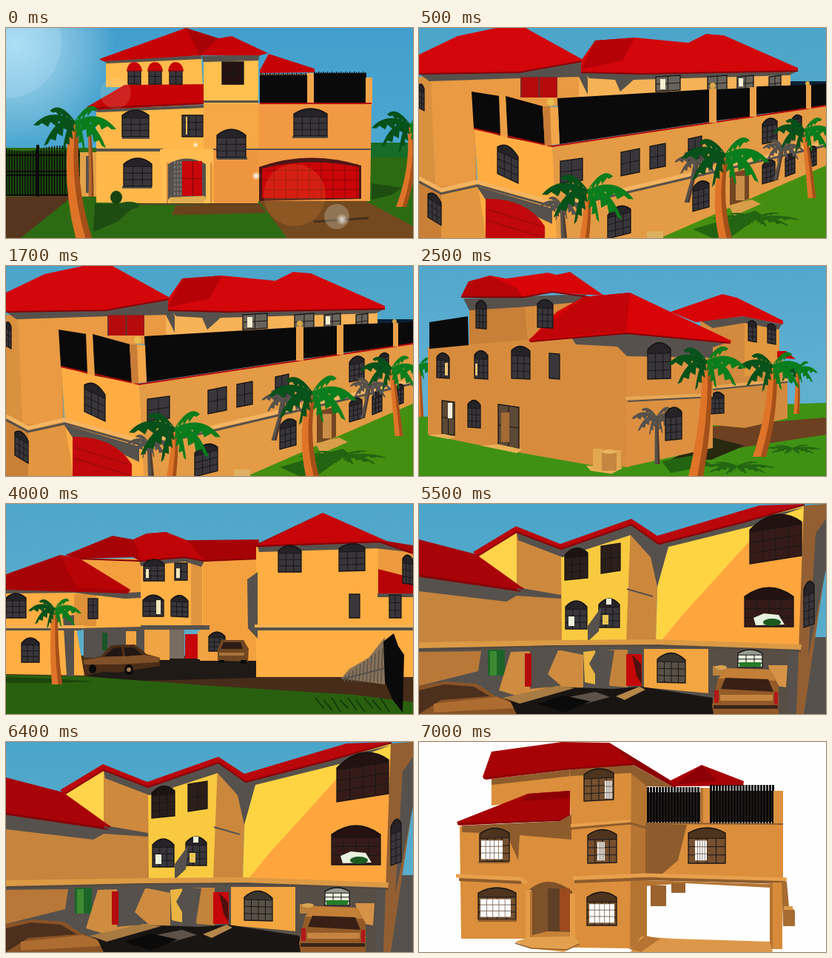
Write an HTML page with a canvas that moves like this. It is 550 by 284 pixels and loops after 8000 ms.

```html
<!DOCTYPE html>
<html>
<head>
<meta charset="utf-8">
<style>
html, body { margin: 0; width: 550px; height: 284px; overflow: hidden; }
canvas { display: block; }
</style>
</head>
<body>
<canvas id="stage" width="550" height="284"></canvas>
<script>
const g = document.getElementById('stage').getContext('2d');
const GREY = '#56514c', RED = '#c60206', MAROON = '#a70306', BLACK = '#0b0a0a', EDGE = '#860006';
const nums = s => s.split(' ').map(Number);

function trace(pts) {
  g.beginPath();
  for (let i = 0; i < pts.length; i += 2) g.lineTo(pts[i], pts[i + 1]);
}
function poly(color, pts) { trace(nums(pts)); g.fillStyle = color; g.fill(); }
function line(color, width, pts) {
  trace(nums(pts)); g.strokeStyle = color; g.lineWidth = width; g.stroke();
}
// One or more boxes: x y w h, x y w h ...
function rect(color, boxes) {
  g.fillStyle = color;
  for (const b of boxes.split(', ')) g.fillRect(...nums(b));
}
function path(color, d) { g.fillStyle = color; g.fill(new Path2D(d)); }
function disc(color, x, y, rx, ry = rx) {
  g.beginPath(); g.ellipse(x, y, rx, ry, 0, 0, 7); g.fillStyle = color; g.fill();
}
function glow(x, y, r, inner) {
  const c = g.createRadialGradient(x, y, 0, x, y, r);
  c.addColorStop(0, inner); c.addColorStop(1, 'rgba(255,255,255,0)');
  disc(c, x, y, r);
}
function sky(color, low) {
  const c = g.createLinearGradient(0, 0, 0, 160);
  c.addColorStop(0, color); c.addColorStop(1, low);
  rect(c, '0 0 550 284');
}

// Windows: x y w h skew arch columns rows; skew lowers the right edge.
function win(list, fill = '#38363a') {
  for (const item of list.split(', ')) {
    const [x, y, w, h, s = 0, arch = 0, cols = 3, rows = 3] = nums(item), bar = '#181617';
    g.save();
    g.transform(1, s / w, 0, 1, x, y);
    g.beginPath();
    g.moveTo(0, h); g.lineTo(0, arch);
    g.quadraticCurveTo(w / 2, -arch, w, arch);
    g.lineTo(w, h); g.closePath();
    g.fillStyle = fill; g.fill();
    g.strokeStyle = bar; g.lineWidth = 1.3; g.stroke();
    g.clip();
    const top = arch ? h * .3 : 0;
    g.fillStyle = 'rgba(0,0,0,.35)'; g.fillRect(0, 0, w, top);
    g.fillStyle = bar;
    for (let i = 1; i < cols; i++) g.fillRect(w * i / cols - .5, top, 1, h);
    for (let i = arch ? 0 : 1; i < rows; i++) g.fillRect(0, top + (h - top) * i / rows - .5, w, 1);
    g.restore();
  }
}

const FRONDS = [[-.6, -.25], [.55, -.3], [-1, .1], [1, .2], [-.75, .6], [.75, .65], [-.3, .75], [.25, .7]];
function crown(x, y, size, light, dark = light) {
  FRONDS.forEach(([dx, dy], k) => {
    const up = [], low = [];
    for (let i = 0; i <= 10; i++) {
      const t = i / 10, a = 2 * t * (1 - t);
      const px = x + size * (a * dx * .6 + t * t * dx);
      const py = y + size * (a * (dy * .4 - .4) + t * t * dy);
      const d = size * Math.sin(Math.PI * t) * (i % 2 ? .3 : .16);
      up.push(px, py);
      low.unshift(px - d * Math.sign(dx) * .4, py + d);
    }
    trace([...up, ...low]); g.fillStyle = k % 2 ? light : dark; g.fill();
  });
}
function trunk(x, y, bx, by, w, bend, color) {
  const mx = (x + bx) / 2 + bend, my = (y + by) / 2;
  const shape = (fill, l, r) => path(fill, `M${x + l * w * .6} ${y}Q${mx + l * w * .8} ${my} ${bx + l * w} ${by}
    H${bx + r * w}Q${mx + r * w * .8} ${my} ${x + r * w * .6} ${y}`);
  shape(color, -.5, .5);
  shape('rgba(70,20,0,.38)', .1, .5);
}
function palm(x, y, bx, by, w, size, bend = 0) {
  trunk(x, y, bx, by, w, bend, '#df7428');
  crown(x, y, size, '#0a7d1d', '#07511a');
}
function palmShade(x, y, bx, by, w, size) {
  trunk(x, y, bx, by, w, 0, GREY);
  crown(x, y, size, GREY);
}
function groundShade(x, y, size) {
  g.save(); g.translate(x, y); g.scale(1.5, .45); crown(0, 0, size, '#236412'); g.restore();
}
function bars(x0, x1, step, top, bottom, width = 1.4) {
  g.fillStyle = BLACK;
  for (let x = x0; x <= x1; x += step) g.fillRect(x, top(x), width, bottom - top(x));
}

function frontDay() {
  sky('#429fcd', '#4ba7d0');
  glow(12, 22, 135, 'rgba(200,240,255,.75)');
  disc('rgba(190,230,255,.22)', 0, 20, 75);
  rect('#2d6b13', '0 162 550 122');
  rect('#176c27', '480 155 70 20');
  poly('#56351f', '0 228 92 226 20 284 0 284');
  poly('#74491f', '341 233 482 232 550 268 550 284 380 284');
  poly('#6a421c', '229 240 342 238 352 250 224 253');
  poly('#1d4d10', '120 238 180 236 150 262 118 276');
  poly('#1d4d10', '494 210 535 216 520 226 494 232');
  rect('rgba(10,40,8,.5)', '0 166 100 60');
  bars(0, 100, 3.6, x => 163 + 4 * Math.sin(x / 15), 227);
  rect(BLACK, '0 171 100 2, 0 193 100 2, 0 198 100 2, 0 225 100 2, 41 158 4 70');
  rect('#e3a24a', '100 168 22 60');
  poly('#ffb849', '122 109 267 104 267 238 122 236');
  poly('#ffbb4d', '135 44 264 38 266 80 135 80');
  poly('#f29a43', '341 102 494 102 492 234 341 234');
  poly('#f7a846', '267 100 341 102 341 237 267 238');
  rect('#ee963f', '281 165 60 72');
  rect('#ffc04e', '267 40 74 62');
  rect(GREY, '108 173 5 50, 267 98 74 3, 122 163 90 4, 280 163 213 2, 285 175 41 3, 387 146 48 3, 157 214 40 3, 157 147 37 3');
  poly(GREY, '130 43 264 37 264 42 136 48');
  poly(GREY, '264 38 343 36 341 44 267 46');
  poly(GREY, '115 110 267 104 267 108 124 114');
  poly(RED, '126 42 243 0 287 14 305 11 354 34 343 37 262 37 131 45');
  poly(MAROON, '243 0 287 14 262 37');
  poly(RED, '343 57 355 35 417 55 417 60 343 61');
  poly(RED, '109 107 160 77 267 76 267 103 113 111');
  line(EDGE, 2, '111 109 267 102');
  rect('#8d7049', '343 62 64 5');
  rect(BLACK, '343 64 64 38, 416 61 71 41');
  bars(344, 404, 3, x => 61 + x % 2, 102);
  bars(416, 486, 3, x => 59 + x % 2, 102);
  rect('#f3a64b', '407 61 9 41, 486 67 9 37');
  rect('#b50a0b', '343 101 151 2');
  for (const x of [165, 193, 221]) {
    win(`${x} 55 17 21 0 0 2 2`);
    path(RED, `M${x - 2} 58Q${x} 46 ${x + 8} 46Q${x + 17} 46 ${x + 19} 58`);
    line(EDGE, 1, `${x - 2} 58 ${x + 19} 58`);
  }
  win('292 46 29 30 0 0 2 2', '#241211');
  win('157 111 36 36 0 7, 238 118 28 29, 285 137 39 38 0 8, 389 109 45 37 0 7 4, 159 176 38 38 0 8');
  rect('#f9bd55', '243 120 2 24');
  path('#4c1717', 'M342 234V188Q410 164 480 186V231');
  path('#cb0508', 'M346 230V190Q410 174 477 188V230');
  for (let x = 362; x < 475; x += 16) line('#8c0608', 1, `${x} 183 ${x} 230`);
  rect('#8c0608', '346 192 131 1, 346 205 131 1, 346 218 131 1');
  rect('#ffbc50', '208 164 72 20');
  path(GREY, 'M219 234V184Q244 169 270 184V234');
  for (let i = 0; i < 24; i++) rect('#79736d', `${227 + i % 3 * 4} ${180 + (i / 3 | 0) * 6} 2 4`);
  rect('#c90609', '238 180 27 47');
  rect('#7c0708', '252 180 1 47, 238 203 27 1');
  poly('#dfad4f', '222 229 268 227 276 236 214 237');
  rect('#ffbf56', '211 182 8 55, 270 182 8 55, 208 233 14 6, 267 233 13 6');
  rect('#d38b3c', '217 182 2 55, 276 182 2 55');
  rect('#57401f', '180 237 160 2');
  disc('#164312', 149, 229, 8, 9); disc('#1e5017', 166, 240, 14, 5);
  trunk(112, 130, 115, 228, 7, 2, '#b7682d');
  palm(93, 126, 106, 287, 22, 56, -17);
  palm(546, 130, 534, 242, 14, 52, 14);
  line('#46301b', 3, '416 262 490 257');
  disc('rgba(255,150,60,.18)', 390, 226, 42);
  disc('rgba(255,235,190,.14)', 148, 88, 21);
  disc('rgba(220,225,220,.28)', 447, 255, 17); glow(454, 259, 8, 'rgba(255,255,255,.8)');
  glow(338, 200, 6, '#fff'); glow(256, 158, 4, '#fff');
}

function cornerView() {
  sky('#4ca5ca', '#55a9c6');
  rect('#0a2238', '500 72 50 38');
  poly('#458f10', '550 184 550 284 320 284');
  poly('#d9903f', '0 66 74 66 80 284 0 284');
  poly('#e99a42', '16 66 140 64 216 58 216 104 75 110 76 212 22 214');
  poly('#f6b257', '216 62 502 60 502 92 216 100');
  poly(GREY, '0 62 140 60 218 46 228 68 228 90 216 66 136 68 14 72');
  poly(GREY, '222 60 512 58 500 64 290 70 272 86 265 70 230 68');
  poly('#d3060a', '0 62 0 36 52 11 104 0 144 0 220 42 220 46 135 60');
  poly('#d3060a', '219 60 219 44 238 17 292 13 364 20 388 8 412 10 512 54 512 59 300 62');
  poly('#b60207', '238 17 292 13 275 44 219 56');
  line(EDGE, 2, '0 62 135 60 220 45');
  line(EDGE, 2, '219 60 300 62 512 58');
  rect('#7b2928', '137 66 50 28');
  rect('#b40b0d', '139 67 22 27, 164 67 22 27');
  win('320 66 33 20 -2 0 2 2, 390 66 26 20 -2 0 2 2, 430 66 22 20 -2 0 2 2, 473 66 16 20 -2 0 2 2', '#69645b');
  rect('#f7eed0', '326 69 7 14, 432 68 6 11');
  poly('#ffad43', '75 136 180 160 190 284 84 284');
  poly('#e49b45', '180 160 550 104 550 186 326 284 186 284');
  poly('#c98036', '0 205 30 222 30 284 0 284');
  poly('#e2963f', '30 218 80 215 91 284 30 284');
  poly(BLACK, '71 86 109 92 111 146 74 135');
  poly(BLACK, '117 92 168 106 171 158 119 148');
  poly(BLACK, '187 95 392 83 392 127 190 157');
  poly(BLACK, '402 83 447 81 447 120 402 125');
  poly(BLACK, '456 79 524 77 524 109 456 117');
  poly(BLACK, '530 77 550 75 550 104 530 108');
  line('#b60909', 2, '74 136 180 160 550 105');
  poly('#ec9f45', '108 91 117 92 120 148 110 146');
  poly('#f2a549', '167 106 188 107 190 157 170 159');
  poly('#c97d37', '167 106 177 106 179 159 170 158');
  rect('#e9a04a', '392 82 10 46, 447 80 9 40, 523 77 7 32');
  disc('#e9bd4f', 178, 100, 5); disc('#d7a847', 397, 78, 4); disc('#d7a847', 525, 75, 3);
  line('#f4b562', 5, '0 203 30 219 78 208 190 239 550 155');
  line(GREY, 3, '0 208 30 224 80 213 190 244 550 159');
  poly(GREY, '78 214 180 244 180 265 140 246 90 232');
  path('#c1080b', 'M90 284V231Q146 230 170 268V284');
  line('#8e0b0c', 1, '91 245 165 268'); line('#8e0b0c', 1, '91 260 168 283');
  win('0 74 7 34 4 4 2, 12 219 18 37 11 6, 106 153 28 44 13 8, 191 180 30 30 -4 0 2 2, 273 168 25 32 -5 0 2 2');
  win('312 160 21 31 -4 0 2 2, 364 150 18 30 -4 0 2 2, 464 124 20 33 -4 6, 504 119 13 20 -3 4');
  win('255 245 31 40 -8 8, 370 210 22 38 -6 6, 464 181 17 30 -5 5, 495 172 13 29 -5 5, 526 162 11 27 -4 4');
  poly('#744622', '420 197 446 190 446 231 420 241');
  rect('#c98d47', '428 200 12 33');
  poly('#d99e4a', '418 240 450 232 462 238 426 254');
  rect('#deb062', '308 275 22 9');
  palmShade(193, 238, 196, 284, 8, 30);
  palmShade(377, 178, 362, 236, 7, 32);
  palmShade(492, 160, 482, 206, 6, 28);
  groundShade(455, 256, 40);
  poly('#236412', '370 272 455 247 463 253 420 284 396 284');
  palm(228, 219, 223, 288, 13, 62, 3);
  palm(414, 170, 415, 288, 18, 60, -15);
  palm(521, 137, 531, 230, 11, 43);
}

function sideView() {
  sky('#52a7cd', '#60b0d0');
  poly('#3f9114', '0 204 550 185 550 284 0 284');
  palm(0, 134, 2, 204, 8, 28);
  poly('#6c4020', '397 217 550 205 550 228 432 246 397 240');
  poly('#27290f', '340 262 397 232 440 243 395 262');
  poly('#d78c3d', '12 110 68 106 68 54 226 42 232 95 284 100 284 272 236 270 100 246 12 228');
  poly('#c87f37', '68 54 142 46 147 100 68 106');
  poly(BLACK, '14 76 66 68 67 107 14 112');
  poly('#d28a3e', '380 74 440 70 487 80 487 122 498 136 498 206 440 219 397 215');
  poly('#e2983f', '440 70 487 80 486 134 440 150');
  poly(GREY, '380 74 440 68 490 79 486 86 440 77 397 84');
  poly(RED, '484 115 496 115 509 126 484 124');
  poly('#d80407', '340 62 410 38 430 43 492 74 492 79 438 68 374 76');
  poly('#dc9040', '280 100 397 100 397 246 280 272');
  poly(GREY, '60 44 225 38 226 48 146 55 68 60');
  poly(GREY, '206 97 282 91 418 103 397 110 397 124 281 122 268 109 212 106');
  poly('#d80407', '57 41 67 21 96 13 118 17 174 9 186 12 204 8 250 40 180 36 142 42');
  poly('#b80508', '67 21 96 13 132 30 140 42 57 41');
  line(EDGE, 2, '57 42 142 42 180 35 230 42');
  poly('#d80407', '148 101 186 62 222 42 285 36 422 101 420 105 280 91 152 103');
  poly('#c10408', '222 42 285 36 280 88 148 100');
  line(EDGE, 2, '150 102 280 91 421 104');
  win('24 117 17 34 1 6, 75 114 18 38 1 6, 125 108 25 44 1 6, 77 46 14 38 1 6, 160 45 21 38 1 6, 66 181 17 37 1 6');
  rect('#eec37c', '35 131 4 17, 76 132 3 16');
  win('176 118 14 34 1 0 1 1, 309 104 31 49 -1 9, 445 73 11 28 2 3 2, 471 77 11 27 2 3 2, 394 171 18 29 -1 5');
  win('31 182 17 45 2 0 2 2, 107 187 28 56 4 0 2 2', '#5c4936');
  rect('#f2f0dd', '39 185 6 21'); rect('#a56b35', '111 198 11 40');
  palmShade(321, 203, 322, 268, 7, 34);
  win('333 192 22 44 -2 7');
  line('#e7a957', 4, '279 179 397 174'); line(GREY, 2, '282 183 397 177');
  line('#e7a957', 4, '397 164 498 154'); line(GREY, 2, '397 167 498 157');
  poly('#e9b057', '84 243 107 241 140 248 132 253');
  poly('#e9b057', '12 229 34 227 50 231 40 234');
  poly('#e9b057', '226 270 276 273 260 281 232 277');
  rect('#e3a852', '235 247 13 28, 262 249 11 25');
  rect('#c78640', '247 251 20 26'); disc('#e8b561', 257, 251, 10, 3);
  poly('#236412', '328 264 376 255 395 269 340 280');
  groundShade(430, 270, 34); groundShade(505, 246, 26);
  palm(511, 139, 510, 200, 8, 28, 2);
  palm(478, 134, 460, 258, 18, 48, 10);
  palm(389, 128, 374, 285, 20, 53, 9);
}

function courtyard() {
  sky('#4ea6ca', '#5badcc');
  rect('#472c19', '0 205 550 79');
  poly('#201a17', '108 232 222 208 338 212 338 235 150 240');
  rect('#f3a13f', '98 74 86 91, 262 74 78 138');
  poly('#ffb146', '182 77 242 73 266 79 266 166 182 166');
  rect('#df943e', '250 78 15 88');
  poly(GREY, '180 75 242 71 268 77 264 85 242 78 182 84');
  poly(MAROON, '80 69 144 43 172 48 190 40 216 38 244 49 342 48 340 74 268 77 242 72 182 78 172 72 98 74');
  poly('#bf0407', '172 48 190 40 216 38 244 49 268 76 242 72 182 76');
  line(EDGE, 2, '98 74 182 77 242 72 268 77 340 74');
  rect(GREY, '95 164 180 6, 105 170 118 38');
  rect('#f0a443', '162 172 14 28, 187 170 34 41, 259 172 15 38');
  rect('#1a5426', '130 174 7 24');
  rect('#786d60', '221 170 20 39');
  rect('#c60609', '242 176 17 33');
  poly('#ffae43', '0 117 168 122 182 122 182 166 95 168 106 232 0 230');
  rect('#dd9139', '92 122 30 43');
  poly(GREY, '0 114 164 120 182 119 182 127 160 128 92 120 0 121');
  poly(MAROON, '0 95 73 69 98 73 168 116 165 121 0 116');
  poly('#b80307', '73 69 98 73 168 116 95 113');
  poly(GREY, '77 152 92 150 92 233 82 233');
  poly('#ffae43', '338 57 506 53 550 64 550 234 338 234');
  poly('#ec9b3e', '503 54 550 65 550 102 503 90');
  poly(GREY, '326 102 340 92 340 182 327 168');
  poly(GREY, '340 57 506 52 546 65 500 60 342 65');
  poly(MAROON, '335 56 428 12 514 50 550 56 550 68 505 52 340 58');
  poly('#c70508', '428 12 514 50 340 56');
  line(EDGE, 2, '336 57 505 51 548 66');
  poly('#b80407', '503 88 550 100 550 123 503 121');
  rect('#f7b154', '0 164 106 4, 336 163 214 4');
  rect(GREY, '0 168 102 3, 338 167 212 4, 502 121 48 5');
  win('0 121 27 33 0 6, 21 181 24 33 0 7, 111 128 13 27 0 0 2, 186 75 28 29 0 6, 185 123 28 29 0 7');
  win('223 123 23 29 1 7, 228 80 17 23 0 0 2 2, 274 173 22 26 0 6, 368 56 31 36 0 7, 450 54 35 37 -1 6');
  win('464 122 14 32 0 0 1 1, 518 123 16 31 0 0 2, 536 68 14 39 2 6');
  rect('#f2e5bc', '189 88 4 12, 230 87 5 13, 203 130 6 19');
  poly('#4c2d17', '104 211 128 206 142 191 174 190 190 203 208 208 208 219 150 228 106 224');
  poly('#805029', '104 211 130 207 188 204 208 208 206 214 150 217 106 217');
  poly('#211813', '133 206 146 194 156 194 157 206');
  poly('#211813', '161 206 160 194 173 194 184 204');
  disc(BLACK, 117, 223, 5, 6); disc(BLACK, 166, 224, 6, 7); disc('#a17b4e', 166, 224, 3);
  poly('#704722', '286 196 291 184 321 184 328 196 327 213 286 212');
  poly('#2b1c14', '290 196 294 187 317 187 320 196');
  rect('#a6733b', '288 201 34 4'); rect(BLACK, '288 211 7 4, 317 211 8 5');
  poly('#28600f', '0 231 104 233 280 246 470 258 550 268 550 284 0 284');
  poly('#1b460d', '0 242 70 242 120 240 60 236 0 234');
  poly('#887258', '453 236 464 223 490 208 512 180 512 244');
  for (let x = 457; x < 512; x += 5) line(GREY, 1.5, `${x} 241 ${x + 2} ${232 - (x - 457) * .75}`);
  line(GREY, 2, '454 237 512 222');
  poly(BLACK, '510 186 520 178 524 175 530 192 538 204 536 282 522 264 512 240');
  for (let i = 0; i < 9; i++) line('#163b0c', 2, `${418 + i * 11} ${262 + i % 2 * 3} ${430 + i * 11} ${277 + i % 3 * 2}`);
  palm(66, 141, 69, 244, 14, 36, -4);
}

function closeUp() {
  sky('#4ba5ca', '#58accc');
  rect(GREY, '0 180 550 104');
  poly('#ffd34a', '78 71 132 37 134 120 110 104');
  poly('#cf893d', '132 37 193 60 194 188 132 188');
  poly('#c6843d', '0 104 136 119 193 127 193 189 0 189');
  poly(GREY, '0 92 140 114 192 123 192 128 132 124 118 132 0 118');
  poly('#f9ca40', '192 61 288 29 281 187 193 187');
  poly('#cb883d', '286 29 324 52 320 186 280 186');
  poly('#ffd443', '324 53 522 2 517 190 320 188');
  poly('#ffa53e', '325 188 358 148 454 42 520 24 516 190');
  poly(GREY, '132 38 193 60 287 27 324 51 521 4 450 30 337 58 322 112 313 72 286 42 194 72 134 49');
  poly('#935f32', '520 2 550 0 550 82 520 284 510 284');
  poly(GREY, '536 40 550 20 550 88 526 206');
  poly('#a80309', '0 48 77 68 141 114 134 118 0 97');
  line(EDGE, 3, '0 97 136 117 141 114');
  poly('#b9070c', '73 65 131 30 191 54 287 20 322 43 460 2 520 0 440 25 324 55 287 28 192 62 132 38 80 71');
  line(EDGE, 2, '80 70 132 38 192 61 287 28 324 54 440 24 521 1');
  line(GREY, 2, '132 115 192 126'); line(GREY, 2, '281 115 316 125');
  win('197 61 31 42 -3 8, 246 57 26 37 -4 0 2 2', '#2b1f1a');
  win('198 131 29 38 0 8, 243 128 28 39 0 8, 520 107 14 60 -5 8 2 4');
  rect('#edf1d9', '202 152 8 13, 253 128 7 8'); rect('#e9c353', '248 150 8 13');
  poly(GREY, '228 165 246 140 243 172 228 186');
  win('447 20 70 61 -11 15 4, 440 113 66 53 0 12 4', '#351b17');
  poly('#e9f2df', '452 154 466 148 486 150 494 163 455 164'); disc('#1d5b20', 477, 160, 12, 5);
  poly('#dc9a44', '0 187 192 184 320 183 517 190 516 197 322 190 190 191 0 195');
  line('#54483d', 2, '0 197 190 192 322 192 516 199');
  poly('#b97837', '0 200 84 199 80 226 0 246');
  rect('#1b6428', '93 197 23 35'); rect('#3a8b31', '96 199 9 33');
  poly('#cf8c40', '124 200 192 198 222 204 222 248 148 264 108 252');
  poly(GREY, '150 198 188 198 174 230 192 246 150 250');
  rect('#b40b0d', '143 202 9 45');
  poly('#eab541', '222 200 240 198 230 216 238 230 238 244 224 241');
  poly('#c3833b', '240 197 282 197 282 248 258 246');
  poly(GREY, '238 196 264 198 256 248 240 246');
  rect('#c60709', '280 203 21 43');
  poly('#50100f', '288 204 300 216 301 244 294 232');
  poly('#f3a53f', '304 196 392 196 392 256 304 248');
  win('322 201 38 40 1 9 4', '#595145');
  poly('#574e46', '391 196 500 199 500 284 391 268');
  win('431 197 33 24 0 5', '#e9efdd'); rect('#257d26', '433 214 29 6');
  poly('#d69347', '472 218 498 218 496 248 478 245');
  poly('#191513', '88 272 180 247 262 250 300 247 396 262 404 284 92 284');
  poly('#a87b43', '113 262 186 246 210 249 136 270');
  poly('#b58749', '266 260 298 247 306 251 278 265');
  poly('#5d5249', '198 262 238 254 258 261 204 276');
  poly(BLACK, '160 270 196 259 232 267 196 282');
  rect('#ba823e', '397 219 18 13'); disc('#d7a451', 408, 221, 8, 3);
  poly('#8a5325', '0 246 36 240 78 243 102 259 122 266 132 284 0 284');
  poly('#4c2f1d', '0 252 34 244 74 247 96 260 30 265 0 284');
  poly('#ad6d30', '20 270 104 261 124 268 128 276 20 282');
  poly('#935a28', '396 272 404 236 416 222 474 224 486 245 486 284 398 284');
  poly('#c47f37', '404 236 416 222 474 224 482 239');
  poly('#382016', '408 250 414 235 472 237 479 254');
  rect('#c58540', '407 258 71 8'); rect('#b3171a', '399 252 6 17, 480 254 5 17');
  rect('#3b2417', '398 272 87 5');
}

function openFront() {
  rect('#fefefe', '0 0 550 284');
  const wall = '#db8e3b', shade = '#8e5c2c', ledge = '#e8a04d', side = '#b57431', deep = '#8d0006';
  poly(wall, '98 52 206 38 206 72 98 86');
  poly(shade, '98 50 206 37 206 46 98 58');
  poly(side, '284 33 308 52 308 264 283 280');
  poly(wall, '203 37 287 32 285 279 209 278');
  poly(shade, '203 36 287 30 344 61 308 60 286 42 204 46');
  poly(MAROON, '86 47 98 13 193 0 257 1 348 57 346 62 290 31 205 37 90 51');
  poly(deep, '257 1 348 57 346 62 290 29');
  line(EDGE, 2, '87 49 205 36 290 30 347 61');
  poly(MAROON, '338 53 382 31 439 53 438 59 346 60');
  poly(deep, '382 31 402 52 346 58');
  poly(wall, '55 114 206 107 210 266 57 266');
  poly(shade, '58 113 190 107 206 98 206 132 136 126 134 160 118 124 58 122');
  poly(MAROON, '51 108 147 70 204 66 204 98 190 106 54 113');
  poly(deep, '147 70 204 66 204 76 140 80');
  line(EDGE, 2, '52 111 190 106 204 98');
  poly(wall, '306 110 492 110 492 190 306 184');
  poly(shade, '306 110 362 112 350 160 322 184 306 182');
  rect('#2c2421', '308 68 72 40, 393 66 86 42');
  bars(308, 379, 4, () => 61, 110, 3); bars(393, 478, 4, () => 58, 110, 3);
  rect('#dc9140', '380 62 13 49, 479 66 13 46'); rect(side, '380 62 4 49');
  line(shade, 2, '306 110 492 111');
  line(ledge, 4, '205 113 286 107'); line(shade, 3, '206 117 286 110 307 116');
  // Window with a see-through strip of width pw, offset px.
  const pane = (x, y, w, h, s, px, pw) => {
    win(`${x} ${y} ${w} ${h} ${s} 7 4`, '#75502f');
    const l = x + px, t = y + h * .36, ph = h * .56;
    rect('#fcfcfa', `${l} ${t} ${pw} ${ph}`);
    for (let i = 1; i < 5; i++) rect('#665143', `${l + pw * i / 5} ${t} .7 ${ph}`);
    for (const k of [.3, .65]) rect('#665143', `${l} ${t + ph * k} ${pw} .8`);
  };
  pane(82, 117, 40, 45, -1, 2, 29); pane(80, 197, 51, 43, 0, 3, 41);
  pane(223, 37, 40, 43, -2, 28, 10); pane(228, 119, 39, 45, -1, 13, 10);
  pane(364, 116, 50, 48, 0, 9, 16); pane(227, 203, 40, 45, 0, 3, 34);
  rect(shade, '80 162 42 2, 80 240 52 3');
  line(ledge, 5, '50 181 137 185 146 191'); line(shade, 4, '54 186 138 190');
  line(ledge, 5, '208 184 286 181 306 180 497 186'); line(shade, 4, '210 189 286 186 306 185 495 190');
  poly(side, '306 187 475 192 475 197 360 191 306 195');
  rect('#9a622e', '313 194 21 28, 341 191 19 13');
  path('#7d512a', 'M146 263V202Q174 176 207 202V263');
  rect('#5f3f26', '174 198 16 61'); rect('#9d4a1e', '190 198 14 57');
  poly('#c68238', '150 262 174 256 206 257 206 266 150 266');
  rect('#e59c46', '144 200 8 66, 204 205 7 65'); rect(side, '150 202 3 62');
  poly('#e3a04c', '130 270 150 264 208 263 218 272 196 284 150 279');
  line(shade, 1.5, '130 272 152 279 200 281 217 273');
  rect('#d78b3a', '474 190 17 90'); rect(side, '474 190 4 90');
  poly('#a66c31', '490 189 497 189 500 222 508 228 508 249 492 249');
  rect('#d99a4c', '493 222 12 5');
  poly('#dc9749', '300 263 345 266 474 270 478 284 286 284');
  poly(side, '284 280 306 262 326 266 300 284');
}

const SCENES = [[500, frontDay], [2500, cornerView], [4000, sideView], [5500, courtyard], [7000, closeUp], [8000, openFront]];
let shown;
function tick() {
  const t = performance.now() % 8000;
  const scene = SCENES.find(([end]) => t < end)[1];
  if (scene !== shown) (shown = scene)();
  requestAnimationFrame(tick);
}
tick();
</script>
</body>
</html>
```
